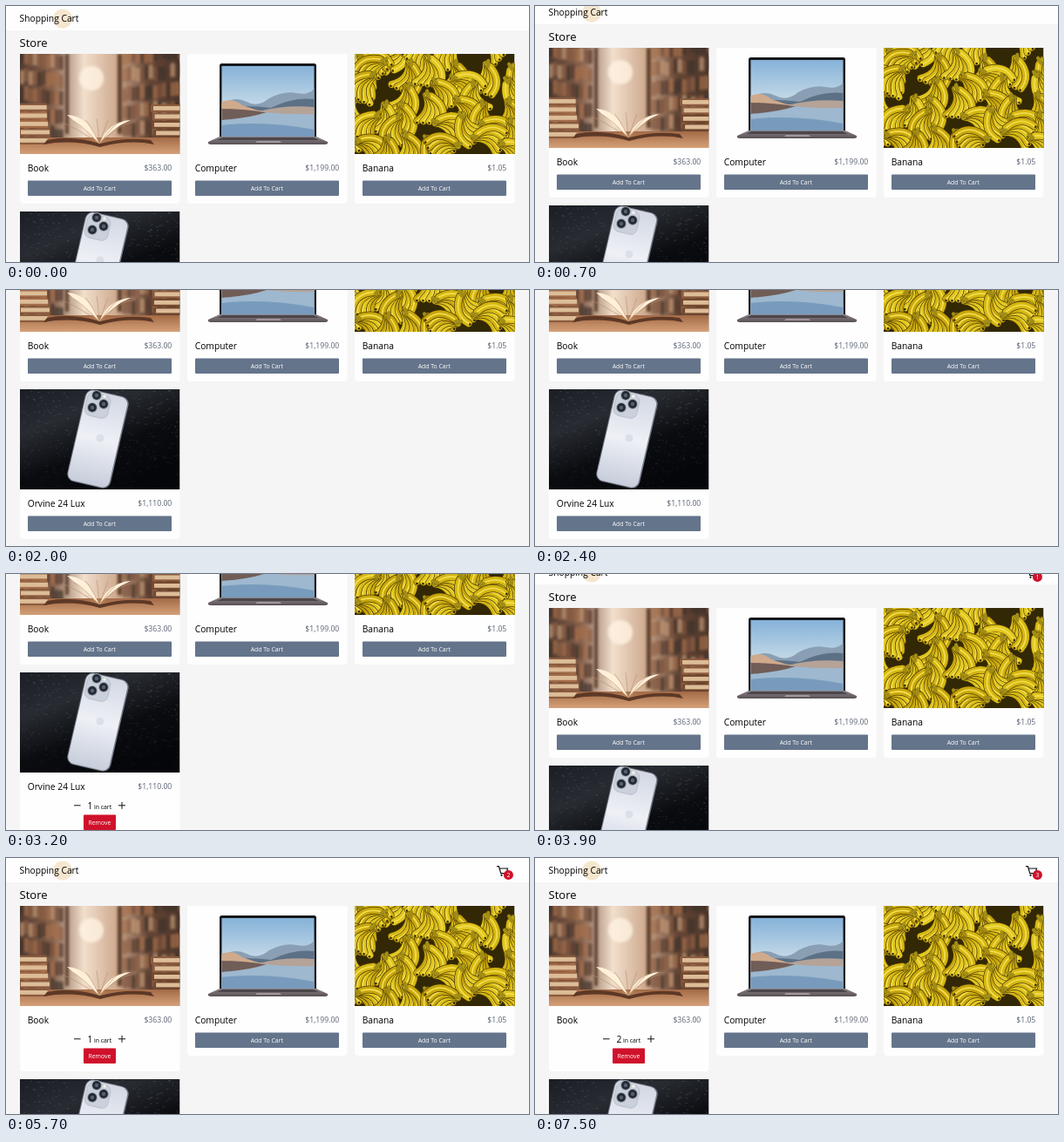
An HTML page that plays this animation: 600x294 px, repeating every 8 s.

```html
<!DOCTYPE html>
<html lang="en">
<head>
<meta charset="utf-8">
<title>Shopping Cart</title>
<style>
html, body { margin: 0; height: 100%; overflow: hidden; background: #f5f5f6; }
#stage { display: block; width: 100vw; height: 100vh; font-family: "Open Sans", "Noto Sans", sans-serif; }
.price { font-size: 8.65px; fill: #596273; text-anchor: end; }
.title { font-size: 10.25px; }
.small { font-size: 6.9px; }
.label { font-size: 6.9px; fill: #fff; text-anchor: middle; }
.line { fill: none; stroke: #111; }
</style>
</head>
<body>
<svg id="stage" viewBox="0 0 600 294"></svg>
<script>
const W = 183.5, H = 115, LOOP = 8000;
const stage = document.getElementById("stage");

let seed = 7;
const rnd = (a = 0, b = 1) => {
  seed = (seed * 16807) % 2147483647;
  return +(a + (b - a) * seed / 2147483647).toFixed(2);
};
const pick = list => list[Math.floor(rnd(0, list.length))];
const repeat = (n, f) => Array.from({ length: n }, (_, i) => f(i)).join("");
const rect = (x, y, w, h, fill, more = "") =>
  `<rect x="${x}" y="${y}" width="${w}" height="${h}" fill="${fill}" ${more}/>`;
const circle = (x, y, r, fill, more = "") =>
  `<circle cx="${x}" cy="${y}" r="${r}" fill="${fill}" ${more}/>`;
const shape = (d, fill, more = "") => `<path d="${d}" fill="${fill}" ${more}/>`;
const gradient = (id, dir, ...colors) =>
  `<linearGradient id="${id}" ${dir}>` + colors.map((c, i) =>
    `<stop offset="${i / (colors.length - 1)}" stop-color="${c}"/>`).join("") + "</linearGradient>";
const DOWN = 'x2="0" y2="1"';

function bookArt() {
  const spines = ["#7b4f38", "#a66f4b", "#54382c", "#8f5f45", "#c19773", "#3f302a"];
  const shelf = (x0, x1, tilt) => repeat(5, row => {
    let out = "";
    for (let x = x0; x < x1; x += 5) {
      const y = row * 21 - 6 + tilt * (x - x0);
      out += rect(x, y + rnd(0, 4), 4.5, 16, pick(spines), 'opacity=".75"');
    }
    return out;
  });
  const stack = (x, w, top, n) => repeat(n, i => {
    const y = top + i * 9.5, shift = rnd(-2, 2);
    return rect(x + shift, y, w, 9, pick(["#8b5b3e", "#a36c48", "#74492f"]), 'rx="1.5"') +
      rect(x + shift + 3, y + 2, w - 3, 4.8, "#dcbd98");
  });
  return gradient("hall", "", "#513a30", "#84604b", "#f1dfcc", "#cfab90", "#654636", "#4b352a") +
    gradient("table", DOWN, "#a36a46", "#d8a47b") +
    gradient("page", DOWN, "#fff3dc", "#d9b48b") +
    '<filter id="soft"><feGaussianBlur stdDeviation="1.5"/></filter>' +
    rect(0, 0, W, H, "url(#hall)") +
    `<g filter="url(#soft)">${shelf(0, 50, .12)}${shelf(118, 186, -.1)}` +
    rect(52, 0, 4, 92, "#654637") + rect(112, 0, 5, 92, "#60422f") +
    circle(82, 28, 14, "#fff3e2", 'opacity=".8"') + "</g>" +
    rect(0, 96, W, 20, "url(#table)") +
    stack(-4, 36, 57, 5) + stack(152, 36, 58, 4) +
    shape("M27 104Q60 98 92 107Q125 98 154 104L150 99Q122 95 92 103Q58 93 31 99Z", "#5d3826") +
    shape("M28 102L47 84Q72 79 91 104Q60 94 28 102Z", "url(#page)") +
    shape("M91 104Q105 79 133 81L151 102Q120 95 91 104Z", "url(#page)") +
    shape("M91 103Q79 71 54 70Q70 83 91 103Q101 78 127 76Q106 85 91 103Z", "#fff0d9") +
    repeat(7, i => `<path d="M91 103Q${62 + i * 9} ${84 - (i % 4) * 2} ${49 + i * 13} ${79 - (3 - Math.abs(i - 3)) * 1.5}" fill="none" stroke="#b98d65" stroke-width=".6"/>`);
}

function laptopArt() {
  return gradient("sky", DOWN, "#86b2d8", "#bdd5e6", "#edeff0") +
    gradient("base", DOWN, "#8e8588", "#575055") +
    rect(0, 0, W, H, "#fefefe") +
    rect(37, 11, 111, 86, "#15171b", 'rx="2.5"') +
    rect(39.5, 14, 106, 81, "url(#sky)") +
    shape("M39.5 57Q55 48 68 55T94 51Q111 42 125 45T145.5 40V70H39.5Z", "#8a9fb3") +
    shape("M39.5 62Q65 58 96 62Q121 49 145.5 52V72H39.5Z", "#5c7086") +
    rect(39.5, 65, 106, 30, "#9db8cf") +
    shape("M39.5 55Q53 50 63 59Q76 64 91 67Q70 74 39.5 74Z", "#d0aa8c") +
    shape("M39.5 63Q60 63 91 67Q70 74 39.5 76Z", "#705d58") +
    shape("M82 66Q112 58 145.5 61V69Q112 70 82 66Z", "#b5a398") +
    shape("M39.5 82Q90 76 145.5 87V95H39.5Z", "#789bbd") +
    shape("M37 95H148L161 101Q162 104 158 104H27Q23 104 24 101Z", "url(#base)") +
    shape("M40 96H145L151 99H34Z", "#4b464b") +
    shape("M80 100H106L108 102H78Z", "#a0969a");
}

function bananaArt() {
  const curve = (d, color, w) =>
    `<path d="${d}" fill="none" stroke="${color}" stroke-width="${w}" stroke-linecap="round"/>`;
  const bunch = (x, y, turn, flip) =>
    `<g transform="translate(${x} ${y}) rotate(${turn}) scale(${flip} 1)">` +
    repeat(5, i => {
      const d = `M${i * 1.5} 0Q${10 + i * 4} ${16 - i * 2} ${i * 7 - 5} ${31 - i}`;
      return curve(d, "#4d3b05", 9) + curve(d, pick(["#d5b611", "#c8a60c", "#e1c61d"]), 7.6) +
        curve(d, "#f0dc4b", 1.8) + circle(i * 7 - 5, 33 - i, 1.3, "#30270a");
    }) + curve("M0-5L3 1", "#a18d17", 4) + "</g>";
  return rect(0, 0, W, H, "#332805") + repeat(42, i =>
    bunch((i % 7) * 29 + rnd(-8, 8), Math.floor(i / 7) * 23 - 15 + rnd(-7, 7), rnd(-65, 65), pick([-1, 1])));
}

function phoneArt() {
  return gradient("leather", 'x2=".6" y2="1"', "#1b1e24", "#282b31", "#0a0c10", "#050609") +
    gradient("silver", DOWN, "#d3d8e3", "#eef0f6", "#c7cddb") +
    rect(0, 0, W, H, "url(#leather)") +
    repeat(420, () => {
      const x = rnd(0, W), y = rnd(0, H);
      return `<path d="M${x} ${y}l${rnd(1, 3)} ${rnd(-1, 1)}" stroke="#747b84" stroke-width=".6" opacity="${(.55 * (1 - y / 145)).toFixed(2)}"/>`;
    }) +
    '<g transform="rotate(13 89 57)">' +
    rect(64, 3, 51, 108, "#757c8a", 'rx="9"') + rect(65, 4, 48.5, 106, "url(#silver)", 'rx="8"') +
    rect(67, 6, 27, 27, "#cbd1dc", 'rx="7" stroke="#aab1bf" stroke-width=".6"') + "</g>" +
    [[88, 7], [83, 21], [96, 17]].map(([x, y]) =>
      circle(x, y, 6, "#a3a9b4") + circle(x, y, 4.9, "#242a33") + circle(x, y, 2.2, "#53606f")).join("") +
    circle(97, 8, 1.7, "#f8f5e8") + circle(92, 56, 4.5, "#dadfe8");
}

function card(id, x, y, name, price, art) {
  return `<g id="${id}" transform="translate(${x} ${y})">` +
    rect(0, 0, W, 172, "#fefefe", 'rx="4" class="panel"') +
    `<svg width="${W}" height="${H}">${art()}</svg>` +
    `<text class="title" x="8.7" y="134.7">${name}</text>` +
    `<text class="price" x="174.3" y="134.3">${price}</text>` +
    `<g class="add">${rect(9, 145.5, 165, 17.5, "#64748b", 'rx="1"')}<text class="label" x="91.3" y="156.8">Add To Cart</text></g>` +
    `<g class="qty"><path class="line" d="M62 152.8h7.6M113 152.8h8M117 148.8v8"/>` +
    `<text class="title count" x="77.6" y="156.5"></text><text class="small" x="85" y="156.5">in cart</text>` +
    rect(73, 163.5, 37, 17.5, "#d0112b", 'rx="1"') + '<text class="label" x="91.4" y="174.8">Remove</text></g></g>';
}

stage.innerHTML = rect(0, 0, 600, 294, "#f5f5f6") + '<g id="page">' +
  rect(0, 0, 600, 28, "#fefefe") + circle(65, 14.5, 11, "#f6e6cf") +
  '<text class="title" x="15.6" y="17.8">Shopping Cart</text>' +
  '<g id="cart"><path class="line" stroke-width="1.2" d="M563 9.6h2.4l2.4 8h6.4l1.3-5.6h-9.2"/>' +
  circle(568.5, 19.8, 1.1, "#111") + circle(573, 19.8, 1.1, "#111") +
  circle(576.4, 19.4, 5.5, "#d0112b") + '<text id="total" class="label" x="576.4" y="21.9"></text></g>' +
  '<text x="15.6" y="46.7" font-size="13">Store</text>' +
  card("book", 16, 55, "Book", "$363.00", bookArt) +
  card("computer", 208, 55, "Computer", "$1,199.00", laptopArt) +
  card("banana", 400, 55, "Banana", "$1.05", bananaArt) +
  card("phone", 16, 236, "Orvine 24 Lux", "$1,110.00", phoneArt) + "</g>";

const $ = s => stage.querySelector(s);
const show = (s, on) => $(s).style.display = on ? "" : "none";
const move = (s, x, y) => $(s).setAttribute("transform", `translate(${x} ${y})`);

function setCount(id, n) {
  show(`#${id} .add`, !n);
  show(`#${id} .qty`, n);
  $(`#${id} .count`).textContent = n;
  $(`#${id} .panel`).setAttribute("height", n ? 190 : 172);
}

const ease = (t, start, length) => {
  const u = Math.min(1, Math.max(0, (t - start) / length));
  return u * u * (3 - 2 * u);
};

setCount("computer", 0);
setCount("banana", 0);

function draw(now) {
  const t = Math.floor(now % LOOP / 100) * 100;
  const phones = t >= 3000 ? 1 : 0;
  const books = t >= 7500 ? 2 : t >= 4500 ? 1 : 0;
  const bottom = phones ? 123 : 122;
  move("#page", 0, -Math.round(bottom * (ease(t, 650, 350) - ease(t, 3610, 375))));
  setCount("book", books);
  setCount("phone", phones);
  move("#phone", 16, books ? 254 : 236);
  show("#cart", books + phones);
  $("#total").textContent = books + phones;
}

const begin = performance.now();
function tick() {
  draw(performance.now() - begin);
  requestAnimationFrame(tick);
}
tick();
</script>
</body>
</html>
```
